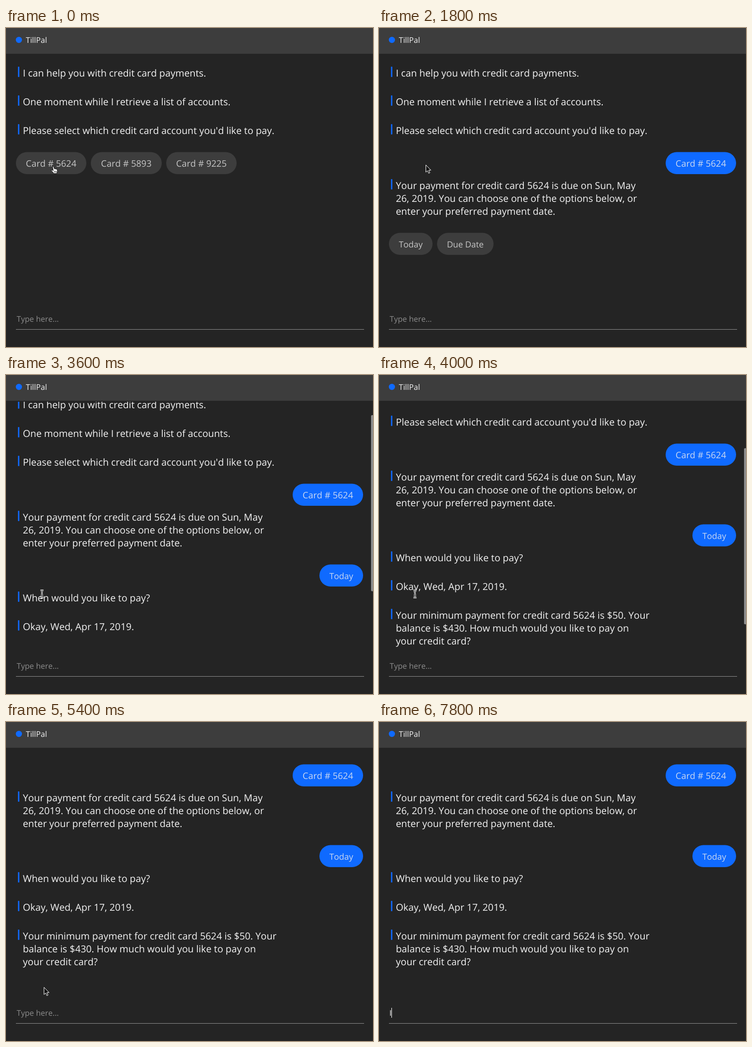
These frames come from a looping animation (740x644 px, 8 s). An HTML page:

```html
<!DOCTYPE html>
<html lang="en">
<head>
<meta charset="utf-8">
<title>Payment chat</title>
<style>
  html, body { margin: 0; width: 100%; height: 100%; overflow: hidden; background: #242424; }
  svg { display: block; width: 100%; height: 100%; font-family: "Open Sans", "Noto Sans", sans-serif; }
  text { font-kerning: none; text-rendering: geometricPrecision; }
  .say { font-size: 19.35px; fill: #f3f3f3; }
  .small { font-size: 15.65px; }
  .chip { text-anchor: middle; }
</style>
</head>
<body>
<svg id="stage" viewBox="0 0 740 644">
  <defs><clipPath id="pane"><rect y="54" width="740" height="496"/></clipPath></defs>
  <rect width="740" height="644" fill="#242424"/>
  <g clip-path="url(#pane)"><g id="feed"></g></g>
  <rect id="thumb" x="736" width="6" height="355.5" rx="2" fill="#8c8c8c"/>
  <rect width="740" height="52" fill="#3d3d3d"/>
  <circle cx="26" cy="24" r="6.2" fill="#0f6aff"/>
  <text class="small" x="40" y="30" fill="#f3f3f3">TillPal</text>
  <text id="hint" class="small" x="21.5" y="593" fill="#8c8c8c">Type here...</text>
  <text id="typed" class="small" x="21" y="593" fill="#f3f3f3">I</text>
  <rect x="20" y="608" width="702" height="1" fill="#8c8c8c"/>
  <rect id="caret" y="577" width="1" height="20" fill="#fff"/>
  <g id="pointer"></g>
</svg>
<script>
const LOOP = 8000, STEP = 200, BLUE = '#0f6aff', GREY = '#3d3d3d';
const byId = id => document.getElementById(id);
const feed = byId('feed'), pointer = byId('pointer');

function add(parent, tag, attrs, text) {
  const el = document.createElementNS('http://www.w3.org/2000/svg', tag);
  for (const key in attrs) el.setAttribute(key, attrs[key]);
  if (text) el.textContent = text;
  parent.appendChild(el);
  return el;
}

const show = (el, on) => el.setAttribute('opacity', +on);
const items = [];

function item(from, to, fade) {
  const el = add(feed, 'g', {});
  items.push({ el, from, to, fade });
  return el;
}

function message(from, base, ...lines) {
  const g = item(from, LOOP, true);
  add(g, 'rect', { x: 24, y: base - 20, width: 3, height: 21, rx: 1, fill: BLUE, opacity: 0.9 });
  lines.forEach((line, i) => add(g, 'text', { class: 'say', x: 34, y: base + 26 * i }, line));
}

function chip(from, to, x, y, width, label, size, sent) {
  const g = item(from, to, false);
  add(g, 'rect', { x, y: y - 0.4, width, height: 44.4, rx: 22.2, fill: sent ? BLUE : GREY });
  add(g, 'text', {
    class: 'chip', x: x + width / 2, y: y + 29, 'font-size': size, fill: sent ? '#c9d8f2' : '#c6c6c6'
  }, label);
}

function waiting(from, to, base) {
  const g = item(from, to, false);
  for (const dy of [-18, -8, 2]) add(g, 'circle', { cx: 25, cy: base + dy, r: 2.1, fill: BLUE });
}

message(-STEP, 98, 'I can help you with credit card payments.');
message(-STEP, 156, 'One moment while I retrieve a list of accounts.');
message(-STEP, 214, "Please select which credit card account you'd like to pay.");
chip(0, 400, 20, 251, 142, 'Card # 5624', 18);
chip(0, 400, 171, 251, 143, 'Card # 5893', 18);
chip(0, 400, 323, 251, 142, 'Card # 9225', 18);
chip(400, LOOP, 578, 251, 142, 'Card # 5624', 18, true);
waiting(600, 1600, 325);
message(1600, 325,
  'Your payment for credit card 5624 is due on Sun, May',
  '26, 2019. You can choose one of the options below, or',
  'enter your preferred payment date.');
chip(1800, 3000, 20, 414, 88, 'Today', 17);
chip(1800, 3000, 117, 414, 114, 'Due Date', 17);
waiting(2000, 2400, 488);
message(2400, 488, 'When would you like to pay?');
chip(3000, LOOP, 632, 414, 88, 'Today', 17, true);
waiting(3000, 3400, 546);
message(3400, 546, 'Okay, Wed, Apr 17, 2019.');
message(3600, 604,
  'Your minimum payment for credit card 5624 is $50. Your',
  'balance is $430. How much would you like to pay on',
  'your credit card?');

// Pointer shapes, each with its hot spot at 0,0
const shapes = {
  arrow: add(pointer, 'path', {
    d: 'M0 0V14.5L3.3 11.5L5.6 16.8L8 15.8L5.8 10.6H10.2Z', fill: '#111', stroke: '#fff'
  }),
  hand: add(pointer, 'g', {}),
  beam: add(pointer, 'g', {})
};
add(shapes.hand, 'path', {
  d: 'M-1.2 .8Q0-.9 1.2.8L2.6 5.4Q3.9 4.5 4.6 5.7Q6 5 6.6 6.3Q8.2 5.9 8.4 7.5L8.7 10.5L7.3 14.8H1L-.3 12.2L-3.7 8.8Q-3.6 7.2-1.8 7.8L.3 9Z',
  fill: '#fff', stroke: '#000', 'stroke-width': 0.9
});
add(shapes.hand, 'path', { d: 'M2.4 9.5V12.8M4.5 9.5V12.8M6.6 9.5V12.8', stroke: '#000', 'stroke-width': 0.8 });
for (const [stroke, width] of [['#fff', 3], ['#111', 1]]) {
  add(shapes.beam, 'path', {
    d: 'M-3-7.5Q0-7.5 0-5Q0-7.5 3-7.5M0-5V5M-3 7.5Q0 7.5 0 5Q0 7.5 3 7.5M-2 2.5H2',
    fill: 'none', stroke, 'stroke-width': width
  });
}

const scrollKeys = [[3400, 0], [3800, 62], [4000, 112], [4200, 146], [4400, 165]];
const moveKeys = [
  [0, 95, 279], [200, 95, 279], [400, 94.5, 276.5], [2000, 94.5, 276.5],
  [2600, 81, 455], [3000, 81, 455], [3600, 72.5, 442], [4800, 72.5, 442], [5800, 79.5, 598]
];
const kindKeys = [
  [0, 'hand'], [400, 'arrow'], [2200, 'beam'], [2400, 'arrow'], [2600, 'hand'],
  [3000, 'arrow'], [3600, 'beam'], [5400, 'arrow'], [5600, 'beam']
];

function along(keys, t) {
  const next = keys.findIndex(k => k[0] > t);
  if (next < 0) return keys[keys.length - 1].slice(1);
  if (next === 0) return keys[0].slice(1);
  const a = keys[next - 1], b = keys[next], u = (t - a[0]) / (b[0] - a[0]);
  return a.slice(1).map((v, i) => v + (b[i + 1] - v) * u);
}

function draw(t) {
  for (const { el, from, to, fade } of items) {
    const level = fade ? Math.min(1, (t - from + 100) / 200) : 1;
    show(el, t >= from && t < to ? level : 0);
  }

  const [scroll] = along(scrollKeys, t);
  feed.setAttribute('transform', `translate(0 ${-scroll})`);
  const thumb = byId('thumb');
  thumb.setAttribute('y', 55.6 + scroll * 0.822);
  show(thumb, t < 3600 || t >= 5200 ? 0 : t < 5000 ? 1 : 0.5);

  const [x, y] = along(moveKeys, t);
  const kind = kindKeys.filter(k => k[0] <= t).pop()[1];
  const typing = t >= 7800;
  pointer.setAttribute('transform', `translate(${x} ${y})`);
  for (const name in shapes) show(shapes[name], name === kind && !typing);

  show(byId('hint'), !typing);
  show(byId('typed'), typing);
  const caret = byId('caret');
  caret.setAttribute('x', typing ? 25 : 21);
  show(caret, typing || (t >= 6000 && t < 6600) || (t >= 7000 && t < 7600));
}

const start = performance.now();
function tick() {
  const t = (performance.now() - start) % LOOP;
  draw(Math.floor(t / STEP) * STEP);
  requestAnimationFrame(tick);
}
tick();
</script>
</body>
</html>
```
